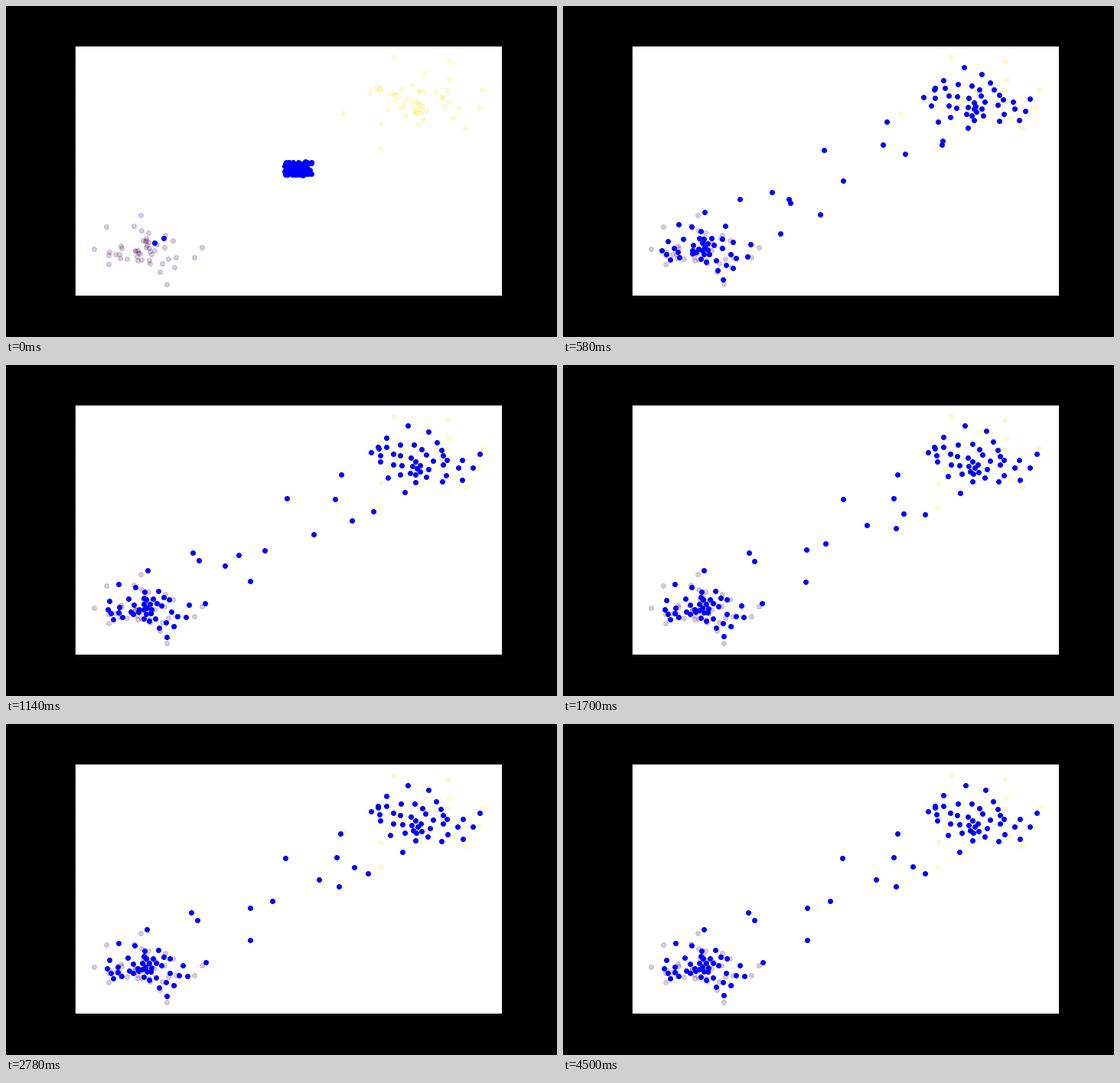
Write a matplotlib script that moves like this. It is 720 by 432 pixels and loops after 4640 ms.

```python
import matplotlib.pyplot as plt
import numpy as np
from matplotlib.animation import FuncAnimation

W, H, DPI = 720, 432, 72
TICK_MS, TICKS = 20, 232
GRID, EPOCHS = 10, 100
CLUSTER_SIZE = 50

# Outlying samples that give each cluster its outline
LOW_KEYS = [(-4.44, -4.49), (-4.77, -4.81), (-7.0, -5.25), (-6.55, -3.67),
            (-5.28, -2.85), (-3.03, -5.14), (-4.32, -7.77), (-3.31, -5.85)]
HIGH_KEYS = [(4.04, 8.41), (6.01, 8.13), (2.18, 4.42), (3.54, 1.91),
             (7.28, 6.11), (7.17, 4.8), (6.66, 3.38), (3.14, 5.84)]

rng = np.random.default_rng(7)


def cluster(keys, center, spread):
    """Key samples plus a normal core without far outliers."""
    core = rng.normal(size=(CLUSTER_SIZE - len(keys), 2)).clip(-1.9, 1.9)
    return np.vstack([keys, center + core * spread])


def train(nodes, samples, rate, sigma):
    """One pass of a self-organizing map over the samples."""
    nodes = nodes.copy()
    for sample in rng.permutation(samples):
        winner = np.argmin(((nodes - sample) ** 2).sum(axis=1))
        reach = np.exp(-grid_dist2[winner] / (2 * sigma ** 2))
        nodes += rate * reach[:, None] * (sample - nodes)
    return nodes


def epoch_at(tick):
    """Epochs are held for 20, 100 and 20 ms in turn."""
    cycle, phase = divmod(tick, 7)
    return 3 * cycle + (phase > 0) + (phase > 5)


low = cluster(LOW_KEYS, (-5.05, -5.25), (0.75, 0.85))
high = cluster(HIGH_KEYS, (5.0, 5.45), (0.85, 0.95))
samples = np.vstack([low, high])

cells = np.argwhere(np.ones((GRID, GRID)))
grid_dist2 = ((cells[:, None] - cells) ** 2).sum(axis=2)

# The nodes start in a unit square; the first ones have already jumped out
nodes = rng.random((GRID ** 2, 2))
nodes[:2] = LOW_KEYS[:2]
history = [nodes]
for epoch in range(1, EPOCHS):
    rate = 0.8 * np.exp(-epoch / 20)
    sigma = 0.65 + 2 * np.exp(-epoch / 4)
    history.append(train(history[-1], samples, rate, sigma))

fig = plt.figure(figsize=(W / DPI, H / DPI), dpi=DPI, facecolor="black")
ax = fig.add_axes([0.125, 0.125, 0.775, 326 / H])
ax.set(xlim=(-7.70, 8.01), ylim=(-8.58, 9.23))
for points, color in ((low, "#440154"), (high, "#fde725")):
    ax.scatter(*points.T, s=36, c=color, alpha=0.2)
dots, = ax.plot([], [], "o", color="blue", ms=6)


def update(tick):
    dots.set_data(*history[epoch_at(tick)].T)
    return dots,


anim = FuncAnimation(fig, update, frames=TICKS, interval=TICK_MS,
                     repeat=True, repeat_delay=0)
plt.show()
```
